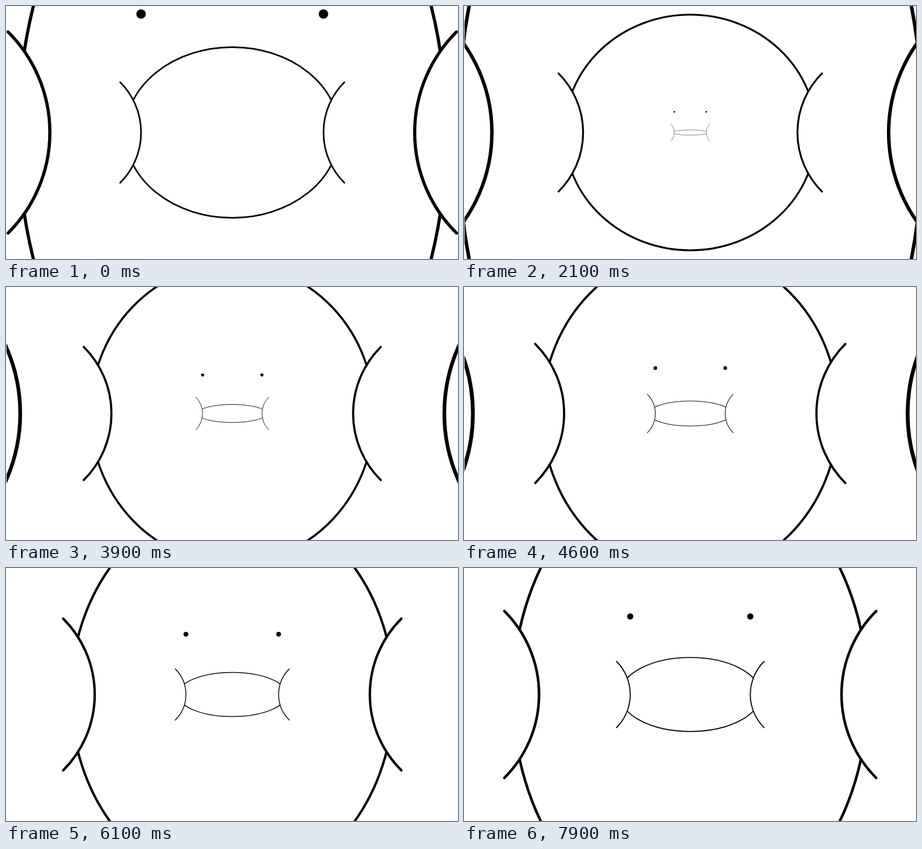
These frames come from a looping animation (826x464 px, 8000 ms). An HTML page with a canvas:

```html
<!DOCTYPE html>
<html lang="en">
<head>
<meta charset="utf-8">
<title>Endless mouth</title>
<style>
  html, body { margin: 0; width: 100%; height: 100%; overflow: hidden; background: #fff; }
  canvas { display: block; }
</style>
</head>
<body>
<canvas id="stage" width="826" height="464"></canvas>
<script>
const ctx = document.getElementById('stage').getContext('2d');
const LOOP = 8000, STEP = 100;
const SPACING = 12;       // seconds between successive faces
const GROWTH = 1 / 4.14;  // scale gained per second

// A face of the given age in seconds: it grows steadily while its mouth opens.
function drawFace(age) {
  const scale = age * GROWTH;
  if (!scale) return;
  ctx.setTransform(scale, 0, 0, scale, 413.5, 232);

  ctx.beginPath();
  ctx.ellipse(0, 0, 67.5, 4.5 * age, 0, 0, 2 * Math.PI);
  ctx.stroke();

  for (const side of [-1, 1]) {
    // The white cheek hides the corner of the lips behind it.
    const mid = side < 0 ? 0 : Math.PI;
    ctx.beginPath();
    ctx.arc(side * 102.5, 0, 45, mid - Math.PI / 4, mid + Math.PI / 4);
    ctx.fillStyle = '#fff';
    ctx.fill();
    ctx.stroke();

    ctx.beginPath();
    ctx.arc(side * 57.5, -75, 3, 0, 2 * Math.PI);
    ctx.fillStyle = '#000';
    ctx.fill();
  }
}

function draw(ms) {
  const time = Math.floor(ms % LOOP / STEP) * STEP / 1000;
  ctx.setTransform(1, 0, 0, 1, 0, 0);
  ctx.fillStyle = '#fff';
  ctx.fillRect(0, 0, 826, 464);
  ctx.lineWidth = 1;
  ctx.lineCap = 'round';
  for (let i = 2; i >= 0; i--) drawFace(time + i * SPACING);

  // Narrow white margin at the left edge.
  ctx.setTransform(1, 0, 0, 1, 0, 0);
  ctx.fillStyle = '#fff';
  ctx.fillRect(0, 0, 1, 464);
}

const start = performance.now();
function tick() {
  draw(performance.now() - start);
  requestAnimationFrame(tick);
}
tick();
</script>
</body>
</html>
```
